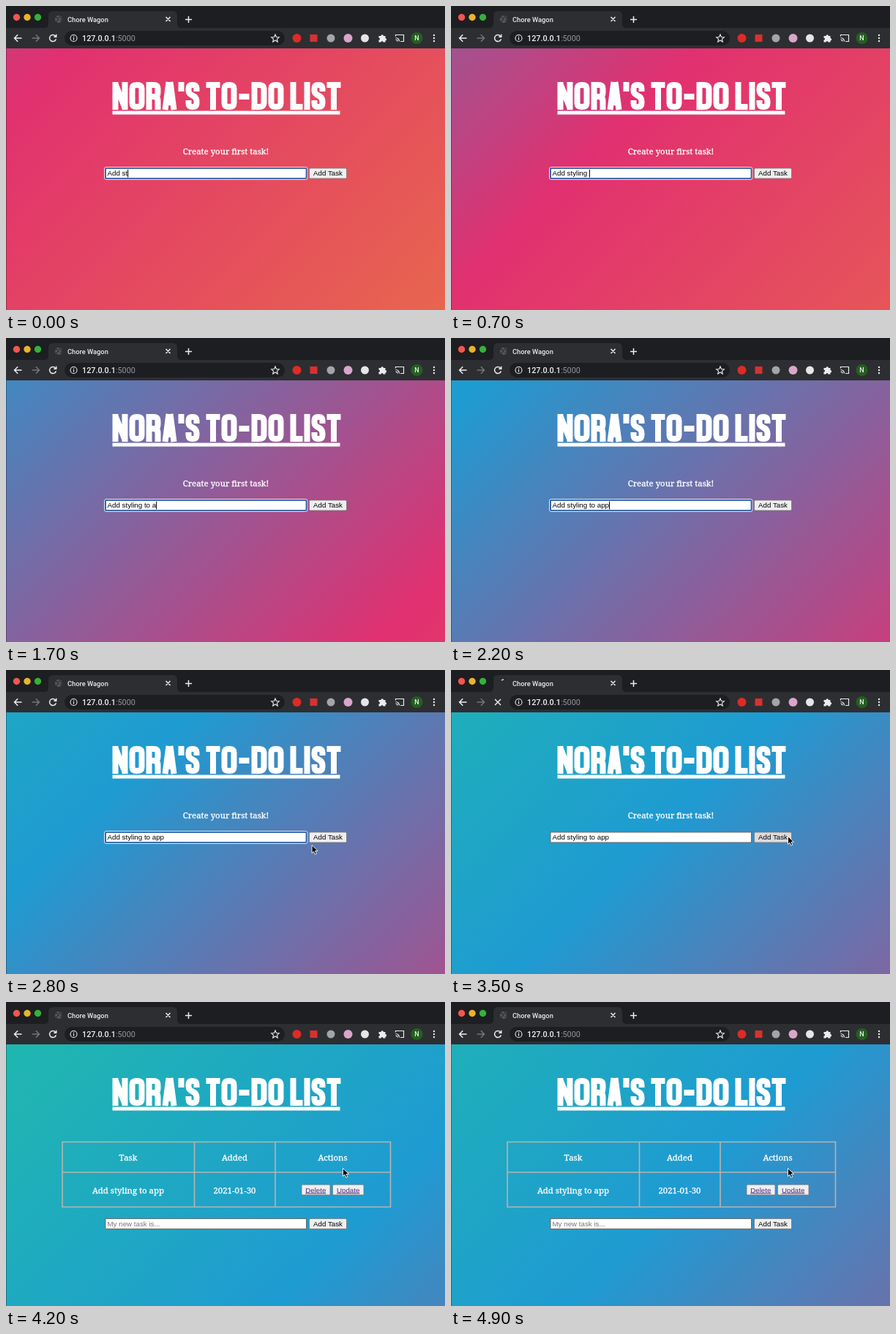
These frames come from a looping animation (600 by 416 pixels, 5000 ms). An HTML page:

```html
<!DOCTYPE html>
<html lang="en">
<head>
<meta charset="utf-8">
<title>To-do list</title>
<style>
  html, body { margin: 0; width: 100%; height: 100%; overflow: hidden; background: #1c1e21; }
  #stage { position: absolute; left: 0; top: 0; width: 600px; height: 416px; overflow: hidden; }
  /* the gradient is sized by the content height --h, not by the window */
  #sky {
    --h: 187px;
    position: absolute; left: 0; top: 58px; width: 600px; height: 358px;
    background-image: linear-gradient(-45deg, #e97048, #e13070, #1e9bd2, #20c89b);
    background-size: 400% calc(var(--h) * 4);
    background-position-y: calc(var(--h) * -1.5);
  }
  #sky.tall { --h: 262px; }
  svg { position: absolute; left: 0; top: 0; }
  .ui { font-family: Roboto, sans-serif; font-weight: 500; }
  .form { font: 9.75px "Liberation Sans", Arial, sans-serif; }
  .slab { font: 500 11.4px "Noto Serif", serif; fill: #fff; stroke: #fff; stroke-width: .3; text-anchor: middle; }
  #title { fill: none; stroke: #fff; stroke-width: 8; }
  .mid { text-anchor: middle; }
  .line { fill: none; stroke: #eceded; stroke-width: 1.5; }
  .button { fill: #efefef; stroke: #767676; stroke-width: .8; }
  .field { fill: #fff; stroke: #6b6b6b; stroke-width: 1; }
  .link { fill: #4a2a80; text-decoration: underline; }
  .grid { fill: none; stroke: #b9b3b0; stroke-width: 1.6; }
</style>
</head>
<body>
<div id="stage">
  <div id="sky"></div>
  <svg width="600" height="416" viewBox="0 0 600 416">
    <!-- browser window -->
    <g class="ui">
      <rect width="600" height="31" fill="#1c1e21"/>
      <rect y="30" width="600" height="28" fill="#2d2e32"/>
      <path d="M52 30q6 0 6-6V13q0-6 6-6H228q6 0 6 6V24q0 6 6 6z" fill="#2d2e32"/>
      <circle cx="14.5" cy="15.5" r="4.7" fill="#f25650"/>
      <circle cx="29" cy="15.5" r="4.7" fill="#e9b32c"/>
      <circle cx="43.5" cy="15.5" r="4.7" fill="#35b13a"/>
      <g id="globe">
        <circle cx="72" cy="18" r="5" fill="#56585c"/>
        <path d="M68 15.5l3 .5 1 2-2 1.5-1 2M73 13.5l.5 2 2.5 1v2.5l-2 2" fill="none" stroke="#2d2e32" stroke-width="1.3"/>
      </g>
      <path id="spinner" d="M72 13a5 5 0 0 0-3 1.2" fill="none" stroke="#dfe1e5" stroke-width="1.4"/>
      <text x="84" y="21.5" font-size="9.3" fill="#eceded">Chore Wagon</text>
      <path class="line" d="M218.5 15l6 6m0-6l-6 6M245 18.5h9m-4.5-4.5v9"/>
      <path class="line" d="M21.5 44H11.5m4.7-4.7L11.5 44l4.7 4.7"/>
      <path class="line" style="stroke:#74767a" d="M35.5 44h10m-4.7-4.7L45.5 44l-4.7 4.7"/>
      <path id="reload" class="line" d="M67.6 41.2a4.5 4.5 0 1 0 .8 4M68.7 38.8v3.4h-3.4"/>
      <path id="stop" class="line" d="M60 40l8 8m0-8l-8 8"/>
      <rect x="80" y="34" width="301" height="20" rx="10" fill="#1c1e21"/>
      <circle class="line" style="stroke-width:1.1" cx="92.5" cy="44" r="4.5"/>
      <path class="line" style="stroke-width:1.2" d="M92.5 43.3v3.2M92.5 41.3v1.2"/>
      <text x="104" y="48" font-size="10.8" fill="#f2f3f3">127.0.0.1<tspan fill="#94979c" font-weight="400">:5000</tspan></text>
      <path class="line" style="stroke-width:1.1" d="M368 39l1.5 3.5 3.8.3-2.9 2.5.9 3.7-3.3-2-3.3 2 .9-3.7-2.9-2.5 3.8-.3z"/>
      <circle cx="397.5" cy="44" r="6" fill="#de2b26"/>
      <rect x="415.5" y="39" width="10" height="10" fill="#d8312f"/>
      <circle cx="444" cy="44" r="5.5" fill="#a4a5a7"/>
      <circle cx="467.5" cy="44" r="6" fill="#d9a6cb"/>
      <circle cx="490.5" cy="44" r="5.5" fill="#e6e6e6"/>
      <path fill="#eceded" d="M509.5 41h3a1.7 1.7 0 1 1 3.4 0h2.6v3a1.7 1.7 0 1 1 0 3.4v2h-3a1.5 1.5 0 1 0-3 0h-3v-2.8a1.6 1.6 0 1 0 0-3.2z"/>
      <path class="line" style="stroke-width:1.2" d="M532.5 41.5V39.5h11v9h-4.5M532.5 43.5a5 5 0 0 1 5 5M532.5 46a2.5 2.5 0 0 1 2.5 2.5"/>
      <circle cx="561.5" cy="44" r="8" fill="#23601f"/>
      <text class="mid" x="561.5" y="47.3" font-size="9" fill="#eceded">N</text>
      <g fill="#eceded"><circle cx="585" cy="40" r="1.2"/><circle cx="585" cy="44" r="1.2"/><circle cx="585" cy="48" r="1.2"/></g>
    </g>
    <path d="M.5 58V416" stroke="#000" stroke-opacity=".3"/>

    <!-- page -->
    <g id="title" role="heading" transform="translate(145.5 104)"></g>
    <rect x="145.5" y="143.5" width="311" height="5" fill="#fff"/>

    <g id="before">
      <text class="slab" x="300.5" y="203">Create your first task!</text>
    </g>

    <g id="after">
      <path class="grid" d="M77 191.5H525.5V280.5H77zM77 233H525.5M257.5 191.5V280.5M368 191.5V280.5"/>
      <g class="slab">
        <text x="167" y="217">Task</text>
        <text x="312.5" y="217">Added</text>
        <text x="446.5" y="217">Actions</text>
        <text x="167" y="261.5">Add styling to app</text>
        <text x="312.5" y="261.5">2021-01-30</text>
      </g>
      <g class="form mid">
        <rect class="button" x="404" y="250" width="39" height="14" rx="1.5"/>
        <rect class="button" x="446.5" y="250" width="42.5" height="14" rx="1.5"/>
        <text class="link" x="423.3" y="260.5">Delete</text>
        <text class="link" x="467.7" y="260.5">Update</text>
      </g>
    </g>

    <g id="form" class="form">
      <rect class="field" x="136" y="222" width="274.5" height="14"/>
      <g id="focus" fill="none">
        <rect x="134.5" y="220.5" width="277.5" height="17" rx="2.5" stroke="#fff" stroke-opacity=".8"/>
        <rect x="136" y="222" width="274.5" height="14" rx="1.5" stroke="#2463b0" stroke-width="1.7"/>
      </g>
      <text id="entry" x="138.5" y="232.3" xml:space="preserve"></text>
      <rect id="caret" y="223.7" width="1" height="10.8"/>
      <rect id="add" class="button" x="414.5" y="222" width="51" height="14" rx="1.5"/>
      <text class="mid" x="440" y="232.3">Add Task</text>
    </g>

    <path id="pointer" d="M0 0V11l2.5-2.3 1.8 4 2-.9-1.8-3.9H8z" fill="#000" stroke="#fff" stroke-width=".9"/>
  </svg>
</div>
<script>
const $ = id => document.getElementById(id);
const LOOP = 5000, STEP = 100;
const TASK = 'Add styling to app';
// time at which each letter after "Add st" is typed
const KEYS = [100, 200, 300, 400, 500, 600, 900, 1000, 1200, 1600, 1800, 2000];
const MOVE = 2500, ARRIVE = 3000, CLICK = 3200, LOAD = 3300, SWAP = 4000;

// condensed display letters, 38 high: width and stroke
const GLYPHS = {
  N: [21, 'M4 38V0M17 38V0M4.5 4L16.5 34'],
  O: [21, 'M4 9Q4 4 10.5 4T17 9V29Q17 34 10.5 34T4 29Z'],
  R: [20, 'M4 38V4H10Q16 4 16 9V15Q16 20 10 20H4M10 20Q16 20 16 26V38'],
  A: [20, 'M4 38L9 0M16 38L11 0M6 28H14'],
  "'": [8, 'M4 0V13'],
  S: [19, 'M15 13V9Q15 4 9.5 4T4 9V12Q4 16 9.5 18.5T15 26V29Q15 34 9.5 34T4 29V25'],
  T: [19, 'M0 4H19M9.5 4V38'],
  '-': [16, 'M1 20H15'],
  D: [21, 'M4 4H10Q17 4 17 10V28Q17 34 10 34H4Z'],
  L: [17, 'M4 0V34H17'],
  I: [8, 'M4 0V38'],
  ' ': [5, '']
};

function letter(box, text, gap) {
  let x = 0;
  box.setAttribute('aria-label', text);
  for (const c of text) {
    const [width, d] = GLYPHS[c];
    const path = document.createElementNS(box.namespaceURI, 'path');
    path.setAttribute('d', d);
    path.setAttribute('transform', `translate(${x} 0)`);
    box.append(path);
    x += width + gap;
  }
}
letter($('title'), "NORA'S TO-DO LIST", 2);

const drift = $('sky').animate([
  { backgroundPositionX: '0%', easing: 'ease' },
  { backgroundPositionX: '100%', easing: 'ease' },
  { backgroundPositionX: '0%' }
], { duration: 15000, iterations: Infinity });
drift.pause();

const show = (id, on) => $(id).style.display = on ? '' : 'none';

function pointerAt(t) {
  const k = Math.min(1, Math.max(0, (t - MOVE) / (ARRIVE - MOVE)));
  const e = k * k * (3 - 2 * k);
  return [340 + 120.5 * e, 262 - 34.5 * e];
}

function render(t) {
  const done = t >= SWAP, focus = t < CLICK, loading = t >= LOAD && !done;
  $('sky').classList.toggle('tall', done);
  drift.currentTime = done ? t - SWAP + 20 : 7890 + t;

  const typed = KEYS.filter(k => k <= t);
  const idle = t - (typed.at(-1) || 0);
  const entry = $('entry');
  entry.textContent = done ? 'My new task is...' : TASK.slice(0, 6 + typed.length);
  entry.setAttribute('fill', done ? '#757575' : '#000');
  $('caret').setAttribute('x', 138.5 + entry.getComputedTextLength());
  show('caret', focus && idle % 1000 < 500);
  show('focus', focus);
  $('form').setAttribute('transform', `translate(0 ${done ? 74.5 : 0})`);
  $('add').style.fill = t >= CLICK && !done ? '#dcdcdc' : '';

  show('before', !done);
  show('after', done);
  show('globe', !loading);
  show('spinner', loading);
  show('reload', !loading);
  show('stop', loading);
  $('spinner').setAttribute('transform', `rotate(${(t - 3500) * .36} 72 18)`);

  show('pointer', t >= MOVE);
  $('pointer').setAttribute('transform', `translate(${pointerAt(t)})`);
}

const start = performance.now();
function tick() {
  const t = (performance.now() - start) % LOOP;
  render(Math.floor(t / STEP) * STEP);
  requestAnimationFrame(tick);
}
tick();
</script>
</body>
</html>
```
